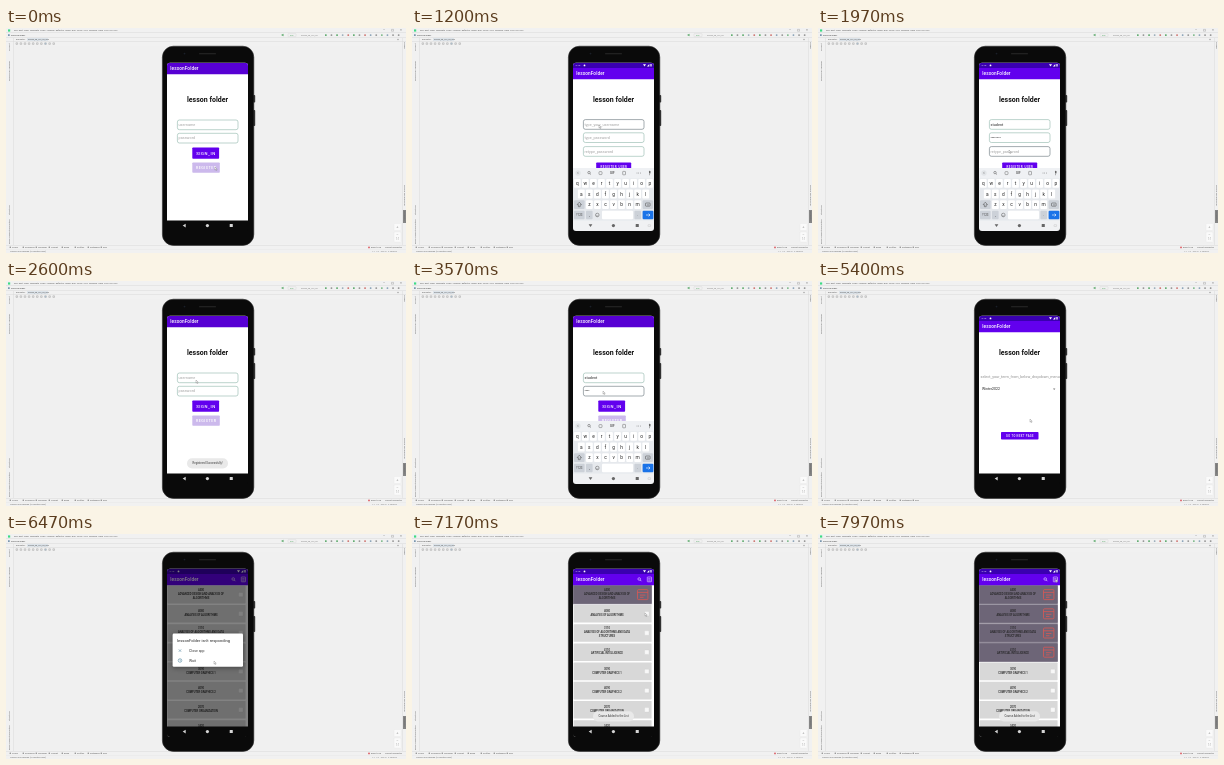
Recreate the animation shown at these times as an HTML page with a canvas. Size 400x225 px, loop 8000 ms.

```html
<!DOCTYPE html>
<html lang="en">
<head>
<meta charset="utf-8">
<title>Phone app demo</title>
<style>
html, body { margin: 0; width: 100%; height: 100%; overflow: hidden; background: #f1f1f1; }
canvas { display: block; width: 400px; height: 225px; }
</style>
</head>
<body>
<canvas id="stage"></canvas>
<script>
const canvas = document.getElementById('stage');
const g = canvas.getContext('2d');
const dpr = window.devicePixelRatio || 1;
canvas.width = 400 * dpr;
canvas.height = 225 * dpr;

const LOOP = 8000;
const APP = 'lessonFolder', HEADING = 'lesson folder';
const PURPLE = '#6200ee', DEEP = '#3a00b0', GREY = '#8c8c8c';

const between = (t, a, b) => t >= a && t < b;
const ramp = (t, a, b) => Math.min(1, Math.max(0, (t - a) / (b - a)));

function box(x, y, w, h, fill, r = 0, stroke, lw = 0.5) {
  g.beginPath();
  g.roundRect(x, y, w, h, r);
  if (fill) { g.fillStyle = fill; g.fill(); }
  if (stroke) { g.strokeStyle = stroke; g.lineWidth = lw; g.stroke(); }
}

function raisedBox(x, y, w, h, r) {
  g.shadowColor = 'rgba(0,0,0,.4)';
  g.shadowBlur = 5 * dpr;
  g.shadowOffsetY = dpr;
  box(x, y, w, h, '#fff', r);
  g.shadowColor = 'transparent';
}

function dot(x, y, r, fill) {
  g.beginPath();
  g.arc(x, y, r, 0, 7);
  g.fillStyle = fill;
  g.fill();
}

function ring(x, y, r, color, lw = 0.6) {
  g.beginPath();
  g.arc(x, y, r, 0, 7);
  g.strokeStyle = color;
  g.lineWidth = lw;
  g.stroke();
}

function line(color, lw, ...p) {
  g.beginPath();
  for (let i = 0; i < p.length; i += 2) g.lineTo(p[i], p[i + 1]);
  g.strokeStyle = color;
  g.lineWidth = lw;
  g.stroke();
}

function poly(fill, ...p) {
  g.beginPath();
  for (let i = 0; i < p.length; i += 2) g.lineTo(p[i], p[i + 1]);
  g.fillStyle = fill;
  g.fill();
}

function text(s, x, y, size, color = '#222', { align = 'left', weight = 400, gap = 0 } = {}) {
  g.font = `${weight} ${size}px Roboto, sans-serif`;
  g.letterSpacing = gap + 'px';
  g.textAlign = align;
  g.textBaseline = 'middle';
  g.fillStyle = color;
  g.fillText(s, x, y);
}

function sideText(s, x, y, turn) {
  g.save();
  g.translate(x, y);
  g.rotate(turn * Math.PI / 2);
  text(s, 0, 0, 2.4, '#666');
  g.restore();
}

// ---- editor around the phone ----
function editor() {
  box(0, 0, 400, 225, '#f1f1f1');
  box(8, 18, 389, 198, '#f0f0f0');
  for (const y of [4.6, 9.6, 13, 217, 221.2]) box(0, y, 400, 0.4, '#dadada');
  box(7, 10, 0.4, 207, '#d5d5d5');
  box(396.6, 10, 0.4, 207, '#d5d5d5');

  box(2, 1.4, 2.2, 2.2, '#3ddc84');
  text('File  Edit  View  Navigate  Code  Analyze  Refactor  Build  Run  Tools  VCS  Window  Help', 8, 2.6, 2.3, '#555');
  text(APP, 98, 2.6, 2.4, '#777');
  text('—', 377, 2.4, 2.6, '#777');
  box(385.5, 1.4, 2, 1.8, null, 0, '#777', 0.3);
  text('×', 394, 2.4, 3.6, '#777');
  box(2, 6.2, 1.7, 1.7, '#7895ad');
  text(APP, 5, 7.2, 2.5, '#444');

  poly('#59a869', 275, 7, 277.5, 5.8, 277.5, 8.2);
  box(282, 5.6, 8, 3, null, 0.5, '#c8c8c8', 0.3);
  text('app', 284, 7.2, 2.1, '#59a869');
  text('Phone_3a_API_30', 295, 7.2, 2.1, '#777');
  const tools = ['#59a869', '#999', '#59a869', '#9fb0bd', '#cf7773', '#59a869', '#999', '#cf7773', '#8ea6ba', '#999', '#7db98a', '#8ea6ba', '#999', '#999'];
  tools.forEach((c, i) => box(319 + i * 5.6, 6.3, 1.7, 1.7, c, 0.4));

  text('Emulator:', 10, 11.5, 2.2, '#555');
  box(21, 10, 21, 3, '#dde4ea');
  text('Phone_3a_API_30_x86', 22, 11.5, 2.1, '#444');
  for (let i = 0; i < 10; i++)
    box(10 + i * 4.1, 14.8, 1.6, 1.6, i === 7 ? '#b8d0e5' : null, 0, '#909090', 0.4);
  dot(392, 11.5, 0.7, '#999');

  sideText('Project', 3, 23, -1);
  sideText('Resource Manager', 3, 53, -1);
  sideText('Structure', 3, 187, -1);
  sideText('Favorites', 3, 201, -1);
  sideText('Build Variants', 3, 216, -1);
  sideText('Gradle', 398.3, 14, 1);
  sideText('Device File Explorer', 398.3, 157, 1);
  box(397, 182, 3, 13, '#858585');
  sideText('Emulator', 398.4, 183.2, 1);

  box(388, 195.5, 7, 7, '#fafafa', 0.6, '#e2e2e2', 0.3);
  text('+', 391.5, 199, 4, '#999', { align: 'center' });
  box(388, 204, 7, 10, '#fafafa', 0.6, '#e2e2e2', 0.3);
  text('−', 391.5, 206.5, 4, '#999', { align: 'center' });
  text('1:1', 391.5, 211.3, 2.6, '#999', { align: 'center' });

  ['TODO', 'Problems', 'Terminal', 'Logcat', 'Build', 'Profiler', 'Database', 'Run'].forEach((s, i) => {
    const x = 6 + i * 13;
    box(x - 2.4, 218.6, 1.4, 1.4, '#999', 0.3);
    text(s, x, 219.4, 2.3, '#555');
  });
  dot(363, 219.4, 0.9, '#db5860');
  text('Event Log', 365, 219.4, 2.3, '#555');
  text('Layout Inspector', 379, 219.4, 2.3, '#555');
  text('Launch succeeded (2 minutes ago)', 4, 223.3, 2.3, '#666');
  text('1:1   LF   UTF-8   4 spaces', 366, 223.3, 2.2, '#777');
}

function phoneBody() {
  box(247, 67, 2.2, 7.5, '#333', 0.8);
  box(247, 82, 2.2, 16, '#333', 0.8);
  box(156.4, 18.2, 91.4, 199.2, '#0a0a0a', 11, '#2c2c2c', 0.6);
  box(193, 25.2, 17, 1, '#2a2a2a', 0.5);
  dot(178.5, 25.6, 0.9, '#1a1f28');
}

// ---- app parts ----
function appBar(status) {
  const y = status ? 40 : 35;
  if (status) {
    box(161, 34.5, 81, 6, DEEP);
    text('2:16', 163.6, 37.4, 2.5, '#fff');
    dot(172.5, 37.4, 0.9, '#fff');
    poly('#fff', 231, 36.2, 234, 36.2, 232.5, 38.5);
    poly('#fff', 235, 38.5, 237.3, 36, 237.3, 38.5);
    box(238.4, 36, 1.2, 2.5, '#fff');
  }
  box(161, y, 81, 11.3, status ? PURPLE : '#5700d3');
  text(APP, 164.3, y + 5.9, 4.7, '#fff', { weight: 500, gap: 0.1 });
}

function heading() {
  text(HEADING, 201.5, 72, 7, '#111', { align: 'center', weight: 700 });
}

function button(s, x, y, w, h, size, gap, fill = PURPLE) {
  box(x, y, w, h, fill, 0.8);
  text(s, x + w / 2 + gap / 2, y + h / 2 + 0.2, size, '#fff', { align: 'center', weight: 500, gap });
}

function field(y, hint, value, active) {
  box(171.4, y, 60.6, 9.7, '#fff', 2, active ? '#66727a' : '#90b8ac', 0.6);
  text(value || hint, 172.5, y + 5, 3.8, value ? '#222' : '#a2a2a2');
}

const typed = (s, t, a, b) => s.slice(0, Math.floor(s.length * ramp(t, a, b)));

function navBar(light) {
  const c = light ? '#666' : '#d5d5d5';
  box(161, 192.4, 81, 15, light ? '#f0f1f3' : '#0a0a0a');
  if (light) poly(c, 176.6, 196.2, 180.4, 196.2, 178.5, 199);
  else poly(c, 179.7, 195.8, 179.7, 199.4, 176.7, 197.6);
  dot(201.4, 197.6, 1.6, c);
  box(223.7, 196, 3.1, 3.1, c, 0.3);
  if (light) box(236, 196.7, 2.6, 1.8, null, 0.3, '#bbb', 0.4);
}

function keyboard(shift) {
  g.save();
  g.translate(0, shift);
  box(161, 140, 81, 53, '#e6e9ed');
  box(161, 140, 81, 10.5, '#eff1f4');
  dot(166, 145, 2.7, '#e2e5e8');
  text('‹', 166, 145, 4.5, '#555', { align: 'center' });
  ring(177, 144.6, 1.2, '#666');
  line('#666', 0.6, 177.9, 145.5, 179, 146.6);
  box(187, 143.6, 3, 3, null, 0.7, '#666', 0.5);
  text('GIF', 200.3, 145.2, 2.9, '#555', { align: 'center', weight: 700 });
  box(210.7, 143.4, 2.8, 3.4, null, 0.4, '#666', 0.5);
  for (const x of [225, 226.7, 228.4]) dot(x, 145, 0.45, '#666');
  box(237, 142.8, 1.5, 2.8, '#666', 0.7);
  box(237.5, 145.8, 0.5, 1.4, '#666');

  ['qwertyuiop', 'asdfghjkl', 'zxcvbnm'].forEach((keys, row) => {
    [...keys].forEach((k, i) => {
      const x = 165.3 + [0, 4, 12.1][row] + i * 8.05, y = 155.4 + row * 10.6;
      box(x - 3.4, y - 4.4, 6.8, 8.8, '#fff', 1);
      text(k, x, y + 0.2, 4.8, '#222', { align: 'center' });
    });
  });
  const grey = '#ccd1d8';
  box(162, 172.2, 10.6, 8.8, grey, 1);
  g.lineJoin = 'round';
  g.beginPath();
  for (const [x, y] of [[167.3, 174.2], [169.5, 176.7], [168.2, 176.7], [168.2, 178.7], [166.4, 178.7], [166.4, 176.7], [165.1, 176.7]]) g.lineTo(x, y);
  g.closePath();
  g.strokeStyle = '#444';
  g.lineWidth = 0.5;
  g.stroke();
  box(230.6, 172.2, 10.4, 8.8, grey, 1);
  box(233.5, 175, 4.6, 3.2, null, 0.6, '#444', 0.5);
  text('×', 236, 176.7, 2.8, '#444', { align: 'center' });
  box(162, 182.8, 10.6, 8.4, grey, 1);
  text('?123', 167.3, 187.2, 3, '#444', { align: 'center' });
  box(174, 182.8, 6.6, 8.4, grey, 1);
  text(',', 177.3, 187, 4.2, '#333', { align: 'center' });
  ring(185.3, 187, 1.8, '#555', 0.5);
  line('#555', 0.5, 184.4, 187.6, 185.3, 188.1, 186.2, 187.6);
  box(190, 182.8, 31, 8.4, '#fff', 1);
  box(222.4, 182.8, 6.6, 8.4, grey, 1);
  text('.', 225.7, 186.5, 4.2, '#333', { align: 'center' });
  box(230.6, 182.8, 10.8, 8.4, '#1a73e8', 1);
  line('#fff', 0.6, 234, 187, 238, 187);
  line('#fff', 0.6, 236.6, 185.6, 238, 187, 236.6, 188.4);
  g.restore();
}

function toast(s) {
  box(181, 177.3, 41, 10.2, '#e9e9e9', 5);
  text(s, 201.5, 182.5, 2.75, '#333', { align: 'center' });
}

// ---- screens ----
function login(t) {
  appBar(false);
  heading();
  field(92, 'username', typed('student', t, 3080, 3320), between(t, 2900, 3400));
  field(105.3, 'password', typed('••••••••', t, 3440, 3680), between(t, 3400, 3900));
  button('SIGN_IN', 186.3, 119.5, 26.8, 11.2, 4.2, 0.55, between(t, 3880, 3980) ? '#8a45f0' : PURPLE);
  button('REGISTER', 186.3, 134.4, 27.5, 10.4, 3.7, 0.45, between(t, 590, 690) ? '#b89ce6' : '#ccb9ec');
}

function register(t) {
  appBar(true);
  heading();
  field(91.6, 'type_your_username', typed('student', t, 1300, 1540), t < 1600);
  field(104.8, 'type_password', typed('••••••••', t, 1660, 1880), between(t, 1600, 1920));
  field(118.6, 'retype_password', typed('••••••••', t, 1960, 2180), t >= 1920);
  button('REGISTER_USER', 184.2, 134.4, 35, 8.2, 3, 0.35);
}

function term(t) {
  appBar(true);
  heading();
  text('select_your_term_from_below_dropdown_menu', 162.5, 96.2, 3.75, GREY);
  text('Winter2022', 164, 108.2, 3.5, '#222');
  poly('#777', 235, 107.6, 237.4, 107.6, 236.2, 109);
  button('GO TO NEXT PAGE', 183, 151, 37.5, 7.6, 2.7, 0.35, between(t, 5540, 5620) ? '#8a45f0' : PURPLE);
  if (between(t, 4500, 4960)) {
    raisedBox(161.5, 102, 79, 34, 0.8);
    ['Winter2022', 'Summer2022', 'Fall2022'].forEach((s, i) => text(s, 164, 108.2 + i * 11, 3.5));
  }
}

const courses = [
  ['4400', 'ADVANCED DESIGN AND ANALYSIS OF', 'ALGORITHMS'],
  ['4080', 'ANALYSIS OF ALGORITHMS'],
  ['3110', 'ANALYSIS OF ALGORITHMS AND DATA', 'STRUCTURES'],
  ['4110', 'ARTIFICIAL INTELLIGENCE'],
  ['3090', 'COMPUTER GRAPHICS 1'],
  ['4090', 'COMPUTER GRAPHICS 2'],
  ['2070', 'COMPUTER ORGANIZATION'],
  ['3420', 'COMPUTER NETWORKS']
];
const picks = [6980, 7220, 7460, 7700];

function list(t) {
  courses.forEach((rows, i) => {
    const y = 51.8 + i * 19.2, mid = y + 8.8, on = t >= picks[i];
    if (on) box(161, y - 0.8, 78.8, 19.3, '#857e8e');
    box(161.6, y, 78, 17.6, on ? '#6d6577' : '#d8d8d8', 0.6);
    rows.forEach((s, k) => text(s, 195, mid - 0.5 + (k - (rows.length - 1) / 2) * 3.9, 2.65, '#222', { align: 'center', weight: 500 }));
    if (on) {
      box(225.5, mid - 5, 10.4, 10, null, 1, '#e8564f', 0.7);
      line('#e8564f', 0.7, 225.5, mid - 2.2, 235.9, mid - 2.2);
      line('#e8564f', 0.7, 228, mid + 0.5, 233.4, mid + 0.5);
      line('#e8564f', 0.7, 228, mid + 2.7, 231.5, mid + 2.7);
    } else box(232.6, mid - 2.2, 4.4, 4.4, '#f8f8f8', 0.5, '#cacaca', 0.3);
  });
  appBar(true);
  ring(227.2, 45, 1.3, '#fff', 0.5);
  line('#fff', 0.6, 228.1, 45.9, 229.4, 47.2);
  box(235.3, 43, 4.2, 4.8, null, 0.4, '#fff', 0.5);
  for (const y of [44.5, 45.7, 46.8]) line('#fff', 0.4, 236.2, y, 238.6, y);
}

function dialog() {
  box(161, 34, 81, 159, 'rgba(0,0,0,.49)');
  raisedBox(166.6, 99.6, 70.4, 33.2, 1.3);
  text(APP + " isn't responding", 171, 106.3, 4.1, '#222');
  line('#3c7792', 0.5, 172.8, 115.4, 175.2, 117.8);
  line('#3c7792', 0.5, 175.2, 115.4, 172.8, 117.8);
  text('Close app', 183, 116.8, 3.5, '#333');
  ring(174, 126.5, 1.8, '#3c7792', 0.5);
  line('#3c7792', 0.4, 174, 125.2, 174, 126.6, 175, 127.1);
  text('Wait', 183, 126.6, 3.5, '#333');
}

// ---- pointer: time, x, y ----
const path = [
  [0, 209, 139], [620, 206, 140], [900, 187, 97], [1250, 187, 97], [1560, 190, 109],
  [1680, 190, 109], [1880, 191, 122], [2140, 191, 122], [2300, 203, 138], [2400, 203, 138],
  [2580, 190, 99], [3300, 190, 100], [3420, 191, 110], [3700, 191, 110], [3880, 201, 126],
  [4020, 201, 126], [4300, 229, 103], [4500, 231, 106], [4780, 190, 108], [4980, 190, 108],
  [5080, 212, 138], [5400, 212, 138], [5540, 204, 155], [6100, 204, 155], [6380, 208, 127],
  [6620, 208, 127], [6900, 233, 61], [7000, 233, 61], [7200, 233, 80], [7240, 233, 80],
  [7420, 233, 99], [7480, 233, 99], [7660, 233, 118], [7720, 233, 118], [7920, 237.5, 45], [8000, 237.5, 45]
];

function pointer(t) {
  const i = path.findIndex(p => p[0] > t);
  const [a, x, y] = path[i - 1], [b, nx, ny] = path[i];
  const k = ramp(t, a, b), e = k * k * (3 - 2 * k);
  g.save();
  g.translate(x + (nx - x) * e, y + (ny - y) * e);
  g.scale(0.75, 0.75);
  g.lineJoin = 'round';
  g.beginPath();
  g.moveTo(0, 0);
  for (const [px, py] of [[0, 4.2], [1, 3.3], [1.7, 4.8], [2.3, 4.5], [1.7, 3.1], [3, 3]]) g.lineTo(px, py);
  g.closePath();
  g.fillStyle = '#fff';
  g.fill();
  g.strokeStyle = '#555';
  g.lineWidth = 0.4;
  g.stroke();
  g.restore();
}

function draw(t) {
  g.setTransform(dpr, 0, 0, dpr, 0, 0);
  editor();
  phoneBody();
  g.save();
  g.beginPath();
  g.roundRect(161, 34.7, 81, 168.3, 3);
  g.clip();
  box(161, 34, 81, 159, '#fff');

  if (t < 720 || between(t, 2380, 4000)) login(t);
  else if (t < 2380) register(t);
  else if (t < 5620) term(t);
  else list(t);

  const [open, shut] = t < 2380 ? [960, 2220] : [2940, 3720];
  const typing = between(t, open, shut + 100);
  if (typing) keyboard(53 * (1 - ramp(t, open, open + 100) + ramp(t, shut, shut + 100)));
  if (between(t, 6020, 6640)) dialog();
  if (between(t, 2430, 3000)) toast('Registered Successfully!');
  if (t >= 7030) toast('Course Added to the List');
  navBar(typing);
  g.restore();
  pointer(t);
}

function tick() {
  draw(performance.now() % LOOP);
  requestAnimationFrame(tick);
}
tick();
</script>
</body>
</html>
```
